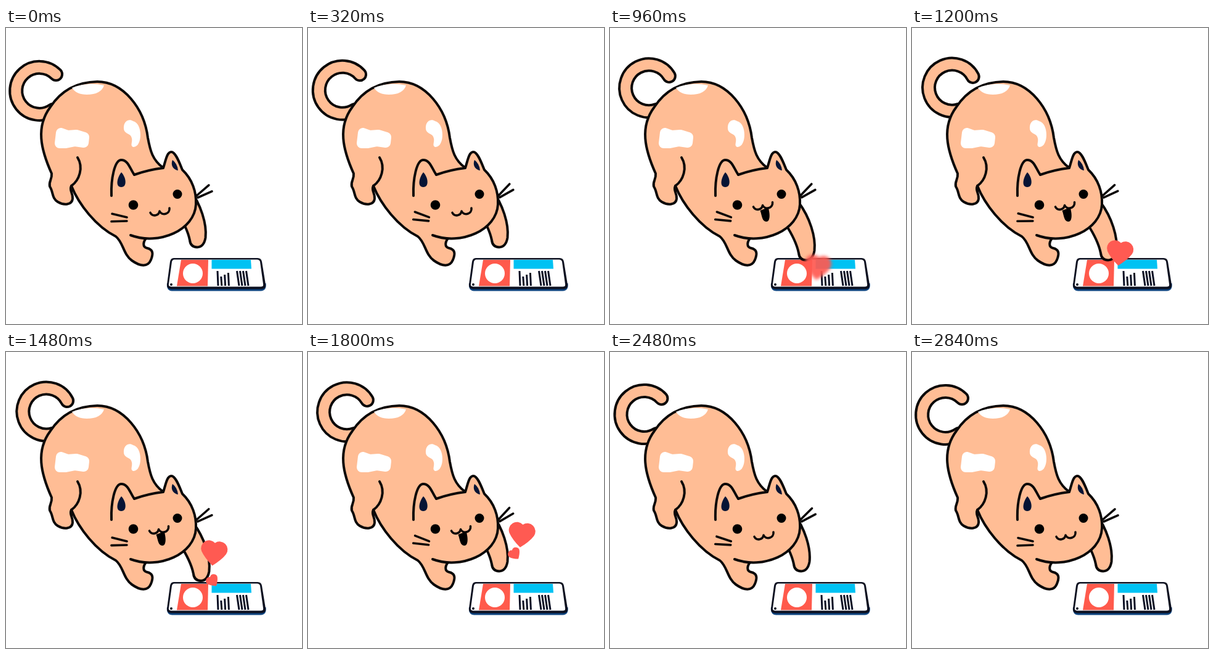
An HTML page for the animation above (2880 ms loop, 480 px wide and 480 px high).

```html
<!DOCTYPE html>
<html lang="en">
<head>
<meta charset="utf-8">
<title>Cat and phone</title>
<style>
  html, body { margin: 0; width: 100%; height: 100%; overflow: hidden; background: #fff; }
  svg { display: block; width: 100%; height: 100%; }
  .line { fill: none; stroke: #0b0808; stroke-width: 4; stroke-linecap: round; stroke-linejoin: round; }
  .fur { fill: #ffbd95; }
  .thin { stroke-width: 3.6; }
  .heart { fill: #ff5a52; }
</style>
</head>
<body>
<svg viewBox="0 0 480 480">
  <defs>
    <path id="tailArc" d="M81 75A38 38 0 1 0 76 133"/>
    <path id="heartShape" d="M0 22Q-14 11 -20 1A13 13 0 0 1 0 -15A13 13 0 0 1 20 1Q14 11 0 22Z"/>
  </defs>

  <g id="tail" fill="none" stroke-linecap="round">
    <use href="#tailArc" stroke="#0b0808" stroke-width="24"/>
    <use href="#tailArc" stroke="#ffbd95" stroke-width="16"/>
  </g>

  <!-- body -->
  <path class="line fur" d="M254 226C238 214 234 200 230 178C224 130 190 87 148 87Q98 88 72 128C48 160 56 196 74 236C75 246 69 248 71 257C77 266 74 276 84 282S107 287 108 277S102 264 106 256C118 286 146 322 178 338C190 347 190 367 204 377S230 388 235 376S237 359 229 357S222 347 228 340"/>
  <path class="line" d="M106 256C119 247 126 226 116 210"/>
  <g fill="#fff">
    <path d="M107 97Q132 87 159 93Q154 108 131 108Q114 108 107 97Z"/>
    <path stroke="#fff" stroke-width="16" stroke-linejoin="round" d="M89 170L100 174 114 173 127 177 126 186 112 184 97 187 87 187Z"/>
    <path d="M191 160C192 150 200 147 206 151C222 154 222 194 206 193C200 190 207 184 203 176C200 170 190 172 191 160Z"/>
  </g>

  <!-- phone -->
  <path fill="#0f4580" d="M261 414H421.500Q423 426 413 426.500H269Q260 426 261 414Z"/>
  <path fill="#0c1020" d="M272 373H408Q414 373 415 379L421 416Q422 423 415 423.500H268Q260 423 261 416L266 379Q267 373 272 373Z"/>
  <path fill="#fff" d="M273 375.500H407Q411 375.500 412 379L417 415Q418 419.500 413 419.500H268Q263 419 264 415L269 379Q270 375.500 273 375.500Z"/>
  <path fill="#ff5a4c" d="M284 376H328L327 418.500H277Z"/>
  <circle cx="303" cy="398" r="16" fill="#fff"/>
  <path fill="#00c2f3" d="M333.500 376H397L398 390.500H333.500Z"/>
  <path id="bars" stroke="#0b1024" stroke-width="3"/>
  <circle cx="268" cy="416" r="2" fill="#0c1020"/>

  <!-- the top of the leg hides behind the head -->
  <path id="leg" class="line fur" d="M298 262C316 286 326 318 323.500 340Q321 355 310 355.500Q299 355 298 344Q294 324 276 296"/>

  <!-- head -->
  <path class="line fur" d="M171 272C170 245 176 214 187 214S201 228 208 238Q230 230 255 227C259 215 261 201 268 201S281 218 286 230C302 245 309 266 308 286C306 328 248 353 202 336"/>
  <path fill="#061435" d="M187 234C180 243 177 258 187 258S195 242 187 234ZM270 214C266 224 273 230 279 231Q278 220 270 214Z"/>
  <circle cx="206.500" cy="287" r="7.800"/>
  <circle cx="278" cy="269.500" r="7.500"/>
  <path id="smile" class="line thin" d="M-15 2.500A8 8 0 0 0 0 0A8.500 8.500 0 0 0 16 -5"/>
  <path id="jaw" d="M0 0L13 -5C16 4 17 18 10 18S3 8 0 0Z"/>
  <path id="leftWhiskers" class="line thin" d="M172 301.500L196 307M171 314L196 313"/>
  <path id="rightWhiskers" class="line thin" d="M309 272L329 255M311 275L334 265"/>

  <use id="bigHeart" class="heart" href="#heartShape"/>
  <use id="smallHeart" class="heart" href="#heartShape"/>
</svg>
<script>
const LOOP = 2880, STEP = 40;
const el = id => document.getElementById(id);
const place = (id, transform) => el(id).setAttribute('transform', transform);
const ease = (t, from, to) => {
  const x = Math.min(1, Math.max(0, (t - from) / (to - from)));
  return x * x * (3 - 2 * x);
};
const swing = (t, period) => (1 - Math.cos(2 * Math.PI * t / period)) / 2;

// Two groups of four bars on the phone; the right group leans.
let bars = '';
for (let i = 0; i < 4; i++) {
  bars += `M${343 + 5.8 * i} ${i ? 406 - 3 * i : 394}l1 ${i ? 12 + 3 * i : 24}`;
  bars += `M${374.5 + 5 * i} 394l3.5 24`;
}
el('bars').setAttribute('d', bars);

function drawHeart(id, t, x, size, tilt) {
  const shrink = ease(t, 1860, 2060);
  const blur = 3.5 * (1 - ease(t, 900, 1120));
  const px = x + 10 * ease(t, 1450, 1850);
  const py = 390 - 96 * ease(t, 850, 1860);
  place(id, `translate(${px} ${py}) rotate(${tilt}) scale(${size * (1 - shrink)})`);
  el(id).setAttribute('opacity', ease(t, 860, 980) * (1 - shrink));
  el(id).style.filter = blur > 0.05 ? `blur(${blur}px)` : 'none';
}

function draw(t) {
  place('tail', `rotate(${18 * swing(t + 60, LOOP)} 77 135)`);

  const reach = ease(t, 660, 920) * (1 - ease(t, 1380, 1680));
  place('leg', `translate(${8 * reach} ${21 * reach})`);

  const open = ease(t, 800, 920) * (1 - ease(t, 2120, 2360));
  place('smile', `translate(${249 - 1.5 * open} ${297 - 9.5 * open})`);
  place('jaw', `translate(243.5 296) scale(1 ${open})`);

  const flick = swing(t + 80, LOOP / 2);
  place('leftWhiskers', `rotate(${13 * flick} 197 310)`);
  place('rightWhiskers', `rotate(${-10 * flick} 308 275)`);

  drawHeart('bigHeart', t, 337, 1, 7);
  drawHeart('smallHeart', t - 340, 335, 0.47, -36);
}

const start = performance.now();
function tick() {
  const t = (performance.now() - start) % LOOP;
  draw(Math.floor(t / STEP) * STEP);
  requestAnimationFrame(tick);
}
tick();
</script>
</body>
</html>
```
